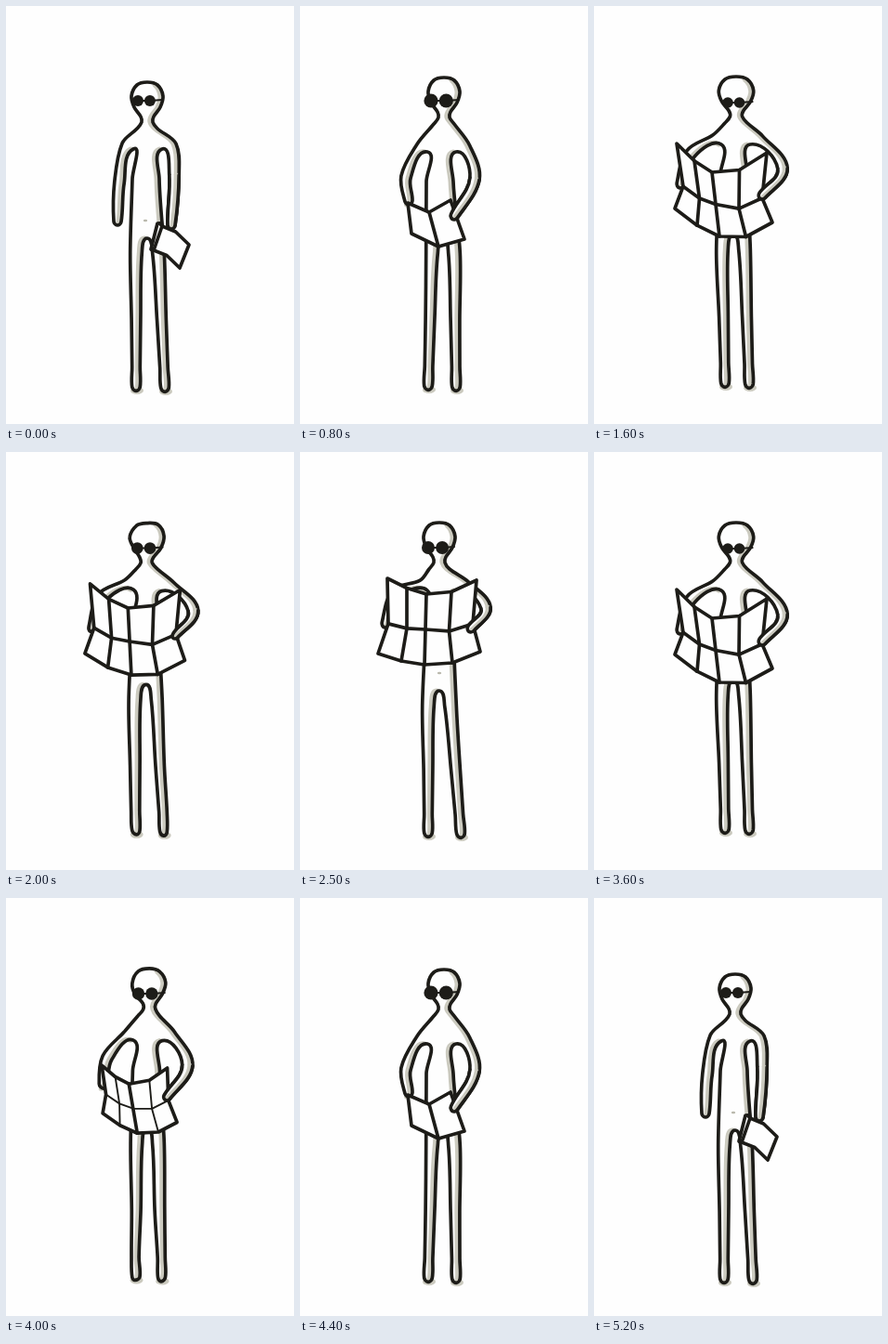
These frames come from a looping animation (310 by 450 pixels, 5.3 s). An HTML page:

```html
<!DOCTYPE html>
<html lang="en">
<head>
<meta charset="utf-8">
<title>Unfolding a map</title>
<style>
  html, body { margin: 0; width: 100%; height: 100%; overflow: hidden; background: #fefefe; }
  svg { display: block; width: 310px; height: 450px; }
  path { stroke-linecap: round; stroke-linejoin: round; }
</style>
</head>
<body>
<svg id="art" viewBox="0 0 310 450"></svg>
<script>
const INK = '#1d1c18', GRAY = '#cbcabf', WHITE = '#fefefe', PEN = 3.7;
const STEP = 100, STEPS = 53, MIDDLE = 26;

// Key poses: closed, half open, open, raised. Arms are elbow and hand;
// the map is the top and bottom of its left edge, spine and right edge.
const poses = [
  { at: 0, head: [152, 82], girth: 1, eye: [142, 102], lens: 6, shoulder: 149,
    armL: [[122, 190], [120, 232]], armR: [[181, 182], [178, 236]],
    crotch: [152, 250], feet: [[140, 410], [171, 411]],
    map: [[163, 234], [156, 262], [168, 237], [159, 263], [197, 257], [187, 282]],
    bend: 0, sag: -4, folds: 0 },
  { at: 8, head: [155, 77], girth: 1, eye: [141, 102], lens: 7.6, shoulder: 152,
    armL: [[114, 184], [117, 210]], armR: [[188, 186], [166, 226]],
    crotch: [154, 250], feet: [[138, 409], [168, 410]],
    map: [[116, 212], [120, 245], [139, 222], [149, 259], [162, 209], [177, 251]],
    bend: 0, sag: 0, folds: 0 },
  { at: 16, head: [153, 76], girth: 1.1, eye: [144, 104], lens: 5.8, shoulder: 144,
    armL: [[104, 159], [93, 192]], armR: [[203, 175], [181, 204]],
    crotch: [150, 246], feet: [[141, 406], [167, 407]],
    map: [[89, 148], [87, 218], [127, 179], [135, 248], [186, 158], [192, 233]],
    bend: 8, sag: 8, folds: 1 },
  { at: 25, head: [150, 76], girth: 1, eye: [138, 103], lens: 7, shoulder: 144,
    armL: [[104, 152], [92, 185]], armR: [[200, 168], [184, 190]],
    crotch: [150, 257], feet: [[138, 410], [173, 411]],
    map: [[94, 136], [84, 217], [136, 153], [134, 229], [190, 138], [194, 215]],
    bend: 6, sag: 5, folds: 1 }
];

// Right half of the head and neck, downwards from the crown.
const profile = [[0, 0], [11, 3], [17, 15], [14, 27], [7, 37], [6, 43], [11, 50]];

const fix = n => n.toFixed(1);
const join = p => p.map(fix).join(' ');

function mix(a, b, u) {
  if (Array.isArray(a)) return a.map((v, i) => mix(v, b[i], u));
  if (typeof a === 'number') return a + (b - a) * u;
  return Object.fromEntries(Object.keys(a).map(k => [k, mix(a[k], b[k], u)]));
}

function noise(n) {
  const s = Math.sin(n * 12.9898) * 43758.5453;
  return (s - Math.floor(s)) * 2 - 1;
}

function unit(a, b) {
  const dx = b[0] - a[0], dy = b[1] - a[1], len = Math.hypot(dx, dy) || 1;
  return [dx / len, dy / len];
}

// Outline of a tapered limb: down the outer side, round the tip, up the inner side.
function limb(joints, widths, side) {
  const last = joints.length - 1;
  const edge = sign => joints.map((p, i) => {
    const [dx, dy] = unit(i === last ? joints[i - 1] : joints[Math.max(0, i - 1)], joints[Math.min(last, i + 1)]);
    return [p[0] + dy * widths[i] * side * sign, p[1] - dx * widths[i] * side * sign];
  });
  const dir = unit(joints[last - 1], joints[last]);
  const tip = joints[last].map((v, i) => v + dir[i] * widths[last]);
  return [...edge(1), tip, ...edge(-1).reverse()];
}

function arm(p, side) {
  const shoulder = [side < 0 ? 131 : 177, p.shoulder];
  return limb([shoulder, ...(side < 0 ? p.armL : p.armR)], [6, 5.2, 4], side).slice(0, -1);
}

function leg(p, side) {
  const hip = [p.crotch[0] + side * 12, p.crotch[1] + 16];
  const foot = p.feet[side < 0 ? 0 : 1];
  return limb([hip, mix(hip, foot, 0.5), mix(hip, foot, 0.85), foot], [6.3, 4.9, 4.3, 4.3], side);
}

// The whole figure is one closed loop, traced from the left shoulder.
function figure(p) {
  const side = s => profile.map(([x, y]) => [p.head[0] + s * x * p.girth, p.head[1] + y]);
  const torso = s => [[s < 0 ? 137 : 168, p.shoulder + 5], [s < 0 ? 136 : 165, p.shoulder + 37]];
  const trunk = [
    ...arm(p, -1), ...torso(-1), ...leg(p, -1), p.crotch,
    ...leg(p, 1).reverse(), ...torso(1).reverse()
  ];
  return {
    pts: [...trunk, ...arm(p, 1).reverse(), ...side(1).reverse(), ...side(-1).slice(1)],
    forearm: [trunk.length, trunk.length + 4]
  };
}

function segments(pts) {
  const n = pts.length, at = i => pts[(i + n) % n];
  return pts.map((a, i) => {
    const b = at(i + 1), reach = Math.hypot(b[0] - a[0], b[1] - a[1]) / 3;
    const ta = unit(at(i - 1), b), tb = unit(a, at(i + 2));
    const c1 = a.map((v, j) => v + ta[j] * reach), c2 = b.map((v, j) => v - tb[j] * reach);
    return { from: 'M' + join(a), to: 'C' + [c1, c2, b].map(join).join(' '), up: b[1] < a[1] - 4 };
  });
}

const path = (d, width, color = INK, fill = 'none') =>
  `<path d="${d}" stroke="${color}" stroke-width="${fix(width)}" fill="${fill}"/>`;
const line = (pts, width) => path('M' + pts.map(join).join('L'), width);
const oval = ([x, y], rx, ry, color) =>
  `<ellipse cx="${fix(x)}" cy="${fix(y)}" rx="${rx}" ry="${ry}" fill="${color}"/>`;

// Fill, then marker shade along every edge that faces right, then ink.
function inked(segs) {
  const d = segs[0].from + segs.map(s => s.to).join('');
  const shade = segs.filter(s => s.up).map(s => s.from + s.to).join('');
  return path(d, 0, 'none', WHITE)
    + `<g transform="translate(-3 0)">${path(shade, 5, GRAY)}</g>` + path(d, PEN);
}

function sheet(p, shake) {
  const [lt, lb, st, sb, rt, rb] = p.map;
  const fold = (a, b, s) => [(a[0] + b[0]) / 2 + s * p.bend, (a[1] + b[1]) / 2 + Math.abs(s) * p.bend * 1.4];
  const row = (l, s, r) => {
    const half = (a, b, k) => [(a[0] + b[0]) / 2, (a[1] + b[1]) / 2 + p.sag * k];
    return [l, half(l, s, 0.4), s, half(s, r, 1), r].map(shake);
  };
  const top = row(lt, st, rt), bottom = row(lb, sb, rb);
  const mid = row(fold(lt, lb, 1), fold(st, sb, 0), fold(rt, rb, -1));
  const column = i => [top[i], mid[i], bottom[i]];
  const rim = [...top, mid[4], ...bottom.slice().reverse(), mid[0]];
  const creases = p.folds > 0 ? [column(1), column(3), mid] : [];
  return path('M' + rim.map(join).join('L') + 'Z', PEN, INK, WHITE)
    + line(column(2), PEN) + creases.map(c => line(c, PEN * p.folds)).join('');
}

function glasses({ eye: [x, y], lens, head, girth }) {
  const right = [x + lens * 2.15, y];
  return line([[x, y], right, [head[0] + 16 * girth, y - 1]], 2)
    + oval([x, y], lens, lens, INK) + oval(right, lens, lens, INK);
}

function draw(m) {
  const k = Math.max(0, poses.slice(0, -1).findLastIndex(p => p.at <= m));
  const a = poses[k], b = poses[k + 1];
  const u = Math.min(1, (m - a.at) / (b.at - a.at));
  const p = mix(a, b, u);
  const wobble = 0.8 * Math.sin(Math.PI * u);
  const shake = (pt, i) => pt.map((v, j) => v + wobble * noise(m * 31 + i * 5 + j));

  const { pts, forearm } = figure(p);
  const segs = segments(pts.map(shake));
  return p.feet.map(([x, y]) => oval([x + 1, y + 4], 7, 4, GRAY)).join('')
    + inked(segs)
    + oval([150, p.crotch[1] - 19], 2.2, 1.3, '#b9b8ac')
    + glasses(p)
    + sheet(p, shake)
    + inked(segs.slice(...forearm));
}

const art = document.getElementById('art');
let shown = -1;

function tick() {
  const i = Math.floor(performance.now() / STEP) % STEPS;
  if (i !== shown) {
    shown = i;
    art.innerHTML = draw(MIDDLE - Math.abs(MIDDLE - i));
  }
  requestAnimationFrame(tick);
}
tick();
</script>
</body>
</html>
```
